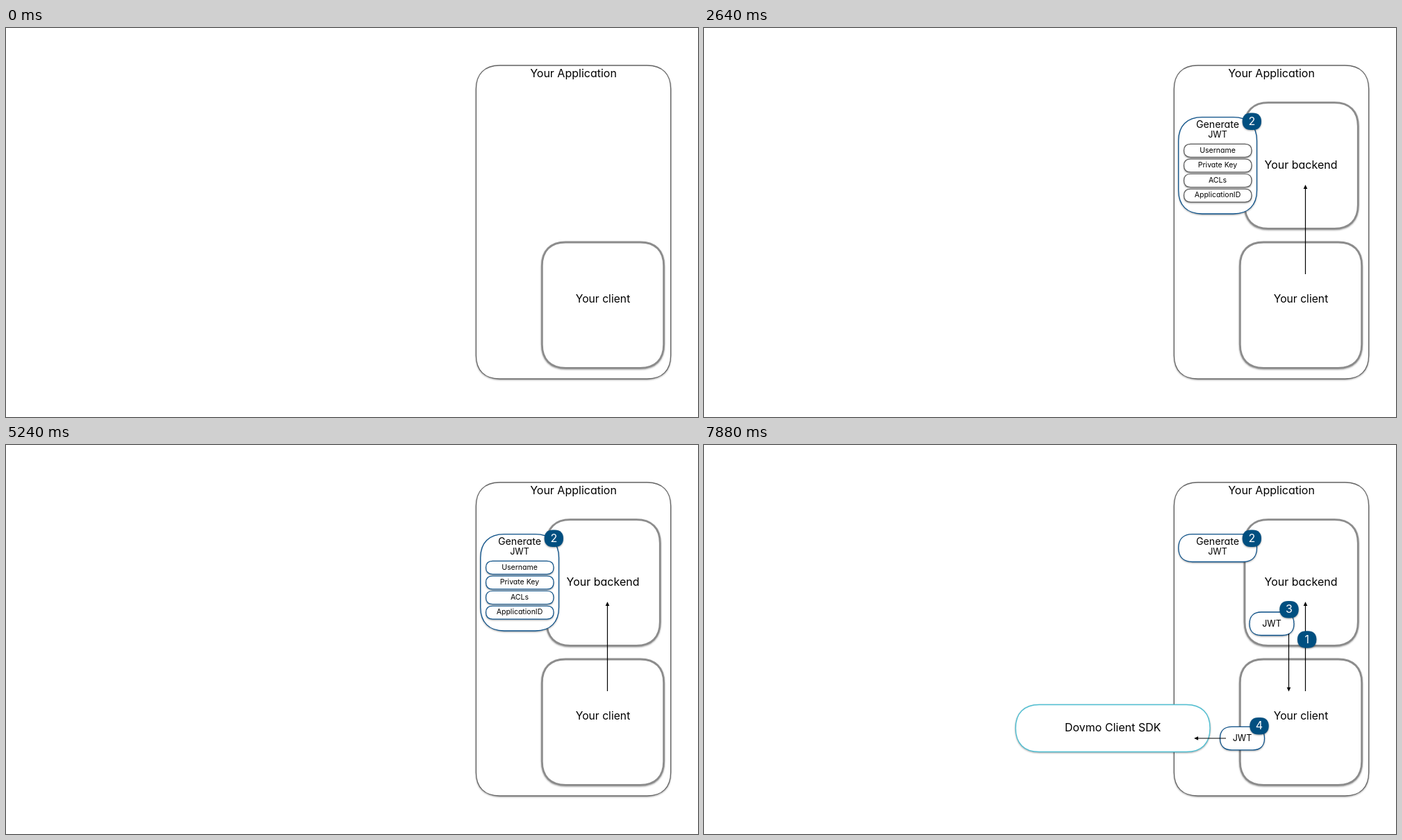
These frames come from a looping animation (997 px wide and 561 px high, 8000 ms). An HTML page:

```html
<!DOCTYPE html>
<html lang="en">
<head>
<meta charset="utf-8">
<title>Login flow</title>
<style>
  html, body { margin: 0; width: 100%; height: 100%; overflow: hidden; background: #fff; }
  svg { display: block; width: 100vw; height: 100vh; }
  text { font-family: Inter, Lato, sans-serif; font-feature-settings: "cv11"; text-anchor: middle; }
  .shadow { filter: drop-shadow(0 1.3px 1.2px rgba(0, 0, 0, .36)); }
</style>
</head>
<body>
<svg id="stage" viewBox="0 0 997 561">
  <defs>
    <linearGradient id="tint" x1="0" y1="0" x2="0" y2="1">
      <stop offset="0" stop-color="#d9f2f5"/>
      <stop offset="1" stop-color="#e6f7f9"/>
    </linearGradient>
  </defs>
  <g id="scene"></g>
</svg>
<script>
const LOOP = 8000;
const STEPS = [880, 1760, 2640, 3520, 4360, 5240, 6120, 7000, 7880];
const NAVY = '#004f80', BLUE = '#0d528a', CYAN = '#4fbfd2', RED = '#e75f70', GREY = '#8c8c8c', DARK = '#595959';
const TINT = 'url(#tint)';

// Rounded box whose corners bulge slightly beyond a circular arc.
function box(x1, y1, x2, y2, stroke, width = 1.3, fill = '#fff') {
  const r = Math.min(34, (y2 - y1) / 2, (x2 - x1) / 2), k = r * .64, m = r - k;
  const d = `M${x1 + r} ${y1}H${x2 - r}c${k} 0 ${r} ${m} ${r} ${r}V${y2 - r}c0 ${k} ${-m} ${r} ${-r} ${r}` +
    `H${x1 + r}c${-k} 0 ${-r} ${-m} ${-r} ${-r}V${y1 + r}c0 ${-k} ${m} ${-r} ${r} ${-r}Z`;
  return `<path class="shadow" d="${d}" fill="${fill}" stroke="${stroke}" stroke-width="${width}"/>`;
}

const label = (text, x, y, size = 16, fill = '#000', cls = '') =>
  `<text class="${cls}" x="${x}" y="${y + size * .35}" font-size="${size}" fill="${fill}">${text}</text>`;

const badge = (n, x, y) =>
  box(x - 13.7, y - 12.2, x + 13.7, y + 12.2, 'none', 0, NAVY) + label(n, x, y - .5, 16, '#fff');

const head = (x, y, angle, color) =>
  `<path d="M0 0L-6 -2.8V2.8Z" fill="${color}" transform="translate(${x} ${y}) rotate(${angle})"/>`;

function arrow(x1, y1, x2, y2, both = false, color = '#000') {
  const angle = Math.atan2(y2 - y1, x2 - x1) * 180 / Math.PI;
  const dx = Math.sign(x2 - x1) * 4, dy = Math.sign(y2 - y1) * 4;
  const start = both ? `${x1 + dx} ${y1 + dy}` : `${x1} ${y1}`;
  return `<path d="M${start}L${x2 - dx} ${y2 - dy}" stroke="${color}" stroke-width="1.2"/>` +
    head(x2, y2, angle, color) + (both ? head(x1, y1, angle + 180, color) : '');
}

const application = () =>
  box(677.3, 54, 957.7, 506, '#666') + label('Your Application', 817.5, 65) +
  box(772.3, 309, 947.7, 490.3, GREY, 2.8) + label('Your client', 860, 391, 15.7);

const backend = () =>
  box(779, 107.6, 942.3, 289.3, GREY, 2.8) + label('Your backend', 860, 197.5);

const login = (withCredentials) =>
  box(868, 247, 965.5, 280, BLUE) + label('Username', 916.5, 263.5, 13.5) +
  (withCredentials
    ? box(868, 284.7, 965.5, 328.8, BLUE) + label('User', 916.5, 299.5, 13.5) + label('credentials', 916.5, 313.5, 13.5)
    : '');

const generate = (bottom) =>
  box(683.7, 128.6, 796.5, bottom, BLUE) + label('Generate', 740, 139.5, 14.2) + label('JWT', 740, 153.3, 12.5);

const claims = (stroke, nameFill) =>
  ['Username', 'Private Key', 'ACLs', 'ApplicationID'].map((name, i) => {
    const y = 167.3 + i * 21.6;
    return box(691.5, y, 789, y + 19, stroke, 1.2, i ? '#fff' : nameFill) + label(name, 740, y + 8.6, 10.5);
  }).join('');

const service = (usersActive) =>
  box(115, 86.3, 352.3, 266.5, RED) + label('Dovmo Application', 234, 97.5) +
  box(122.3, 130.5, 202.8, 170.8, CYAN, 1.3, usersActive ? TINT : '#fff') + label('Users', 162.5, 150, 14.5) +
  box(384.7, 117, 574.4, 184, CYAN, 1.4, usersActive ? 'none' : TINT) +
  label('Conversation API', 479.8, 149.8, 16, '#000', usersActive ? 'shadow' : '') +
  arrow(356, 149.8, 388, 149.8, true, GREY);

const token = (x, y) => box(x, y, x + 64, y + 33.5, BLUE) + label('JWT', x + 32, y + 16.3, 12.5);

const sdk = () =>
  box(449, 374.5, 729, 442.5, CYAN, 1.4) + label('Dovmo Client SDK', 589, 407.3) +
  token(743.5, 406.3) + arrow(752, 423, 706, 423) + badge(4, 800, 405.2);

function draw(step) {
  const last = step === 9;
  const generating = step >= 3 && step <= 6;
  const serving = step === 4 || step === 5;
  let out = application();
  if (step >= 1) out += backend() + arrow(866.5, 355, 866.5, 226);
  if (step === 1 || step === 2) out += login(step === 2);
  if (step === 1 || step === 2 || last) out += badge(1, 868.7, 280.5);
  if (generating) out += generate(268) + claims(step === 6 ? BLUE : DARK, step === 5 ? TINT : '#fff');
  if (last) out += generate(168.5);
  if (serving) out += service(step === 5);
  if (generating || last) out += badge(2, 789.3, 134.7);
  if (serving) out += arrow(559, 123.4, 782, 123.4, true);
  if (step === 7 || last) out += token(786, 241) + badge(3, 843, 237.3);
  if (step >= 7) out += arrow(842.5, 272, 842.5, 355.5);
  if (step >= 8) out += sdk();
  return out;
}

const scene = document.getElementById('scene');
let shown = -1;
function tick() {
  const time = performance.now() % LOOP;
  const step = STEPS.filter(start => start <= time).length;
  if (step !== shown) scene.innerHTML = draw(shown = step);
  requestAnimationFrame(tick);
}
tick();
</script>
</body>
</html>
```
